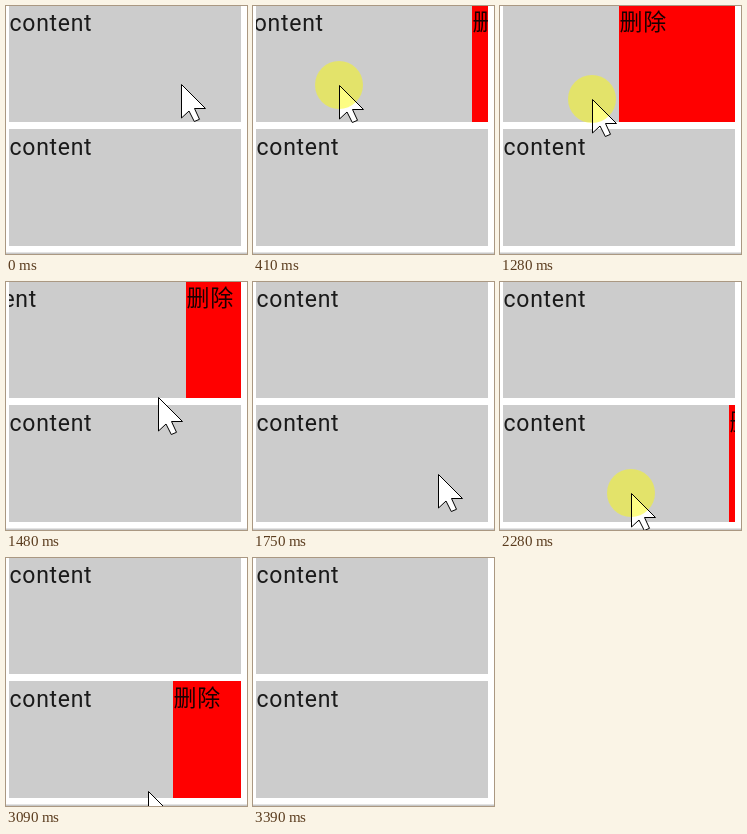
Write an HTML page with a canvas that moves like this. It is 241 px wide and 248 px high and loops after 3580 ms.

```html
<!DOCTYPE html>
<html lang="zh-CN">
<head>
<meta charset="utf-8">
<title>Swipe to delete</title>
<style>
html, body { margin: 0; width: 100%; height: 100%; overflow: hidden; background: #fff; }
canvas { display: block; }
</style>
</head>
<body>
<canvas id="stage" width="241" height="248"></canvas>
<script>
const ctx = document.getElementById('stage').getContext('2d');
const LOOP = 3580;
const POINTER_GONE = 3390;
const CARD = { x: 3, w: 232, h: 117 };
const PITCH = 124;
const OPEN = CARD.w / 2;
const SETTLE = 200;

const linear = u => u;
const sineOut = u => Math.sin(u * Math.PI / 2);
const smooth = u => u * u * (3 - 2 * u);
const cubicOut = u => 1 - (1 - u) ** 3;
const progress = (t, from, to) => Math.min(1, Math.max(0, (t - from) / (to - from)));
const mix = (a, b, k) => a + (b - a) * k;

// Each move starts where the previous one ended; bend curves the path vertically.
const home = { x: 176, y: 78 };
const moves = [
  { from: 130, to: 760, x: 38, y: 93, ease: sineOut, bend: 6 },
  { from: 1130, to: 1750, x: 186, y: 192, ease: sineOut, bend: 6 },
  { from: 1960, to: 2690, x: 55, y: 223, ease: smooth, bend: 0.55 },
  { from: 2720, to: 3390, x: 214, y: 241, ease: linear, bend: 1 }
];

const drags = [
  { row: 0, press: 355, release: 550, start: 0, end: OPEN },
  { row: 0, press: 1280, release: 1480, start: OPEN, end: 0 },
  { row: 1, press: 2257, release: 2430, start: 0, end: OPEN },
  { row: 1, press: 2890, release: 3090, start: OPEN, end: 0 }
];

function pointerAt(t) {
  let { x, y } = home;
  for (const m of moves) {
    const k = m.ease(progress(t, m.from, m.to));
    x = mix(x, m.x, k);
    y = mix(y, m.y, k ** m.bend);
  }
  return { x, y };
}

// The action follows the pointer while pressed, then settles open or closed.
function revealAt(row, t) {
  const drag = drags.filter(d => d.row === row && d.press <= t).pop();
  if (!drag) return 0;
  const { press, release, start, end } = drag;
  const held = start + pointerAt(press).x - pointerAt(Math.min(t, release)).x;
  return mix(held, end, cubicOut(progress(t, release, release + SETTLE)));
}

function drawRow(row, reveal, textShift) {
  const { x, w, h } = CARD;
  const top = row * PITCH - 1;
  const baseline = row * PITCH + 25;
  const edge = Math.round(x + w - reveal);
  ctx.save();
  ctx.beginPath();
  ctx.rect(x, top, w, h);
  ctx.clip();
  ctx.fillStyle = '#ccc';
  ctx.fillRect(x, top, w, h);
  ctx.fillStyle = '#1a1a1a';
  ctx.fillText('content', x + 0.6 - textShift, baseline);
  if (reveal > 0) {
    ctx.fillStyle = '#f00';
    ctx.fillRect(edge, top, x + w - edge, h);
    ctx.fillStyle = '#1a0000';
    ctx.fillText('删除', edge + 0.6, baseline - 0.6);
  }
  ctx.restore();
}

function drawPointer({ x, y }, pressed) {
  const arrow = new Path2D('M0 0V33.5L7.5 26.5L12.8 37L18 34.8L13 24H24Z');
  ctx.save();
  ctx.translate(Math.round(x) - 0.5, Math.round(y) + 0.5);
  ctx.fillStyle = '#fff';
  ctx.fill(arrow);
  if (pressed) {
    ctx.fillStyle = 'rgba(252, 252, 10, 0.5)';
    ctx.beginPath();
    ctx.arc(-0.5, -0.5, 24, 0, Math.PI * 2);
    ctx.fill();
  }
  ctx.strokeStyle = '#000';
  ctx.lineWidth = 1;
  ctx.stroke(arrow);
  ctx.restore();
}

function draw(t) {
  ctx.fillStyle = '#fff';
  ctx.fillRect(0, 0, 241, 248);
  ctx.fillStyle = '#c8c8c8';
  ctx.fillRect(0, 246.5, 241, 1.5);

  ctx.font = '23px Roboto, "Noto Sans CJK SC", "Noto Sans CJK", sans-serif';
  ctx.letterSpacing = '0.7px';
  const first = revealAt(0, t);
  drawRow(0, first, first);
  drawRow(1, revealAt(1, t), 0);

  if (t < POINTER_GONE) {
    const pressed = drags.some(d => t >= d.press && t < d.release);
    drawPointer(pointerAt(t), pressed);
  }
}

const start = performance.now();
function loop() {
  draw((performance.now() - start) % LOOP);
  requestAnimationFrame(loop);
}
loop();
</script>
</body>
</html>
```
